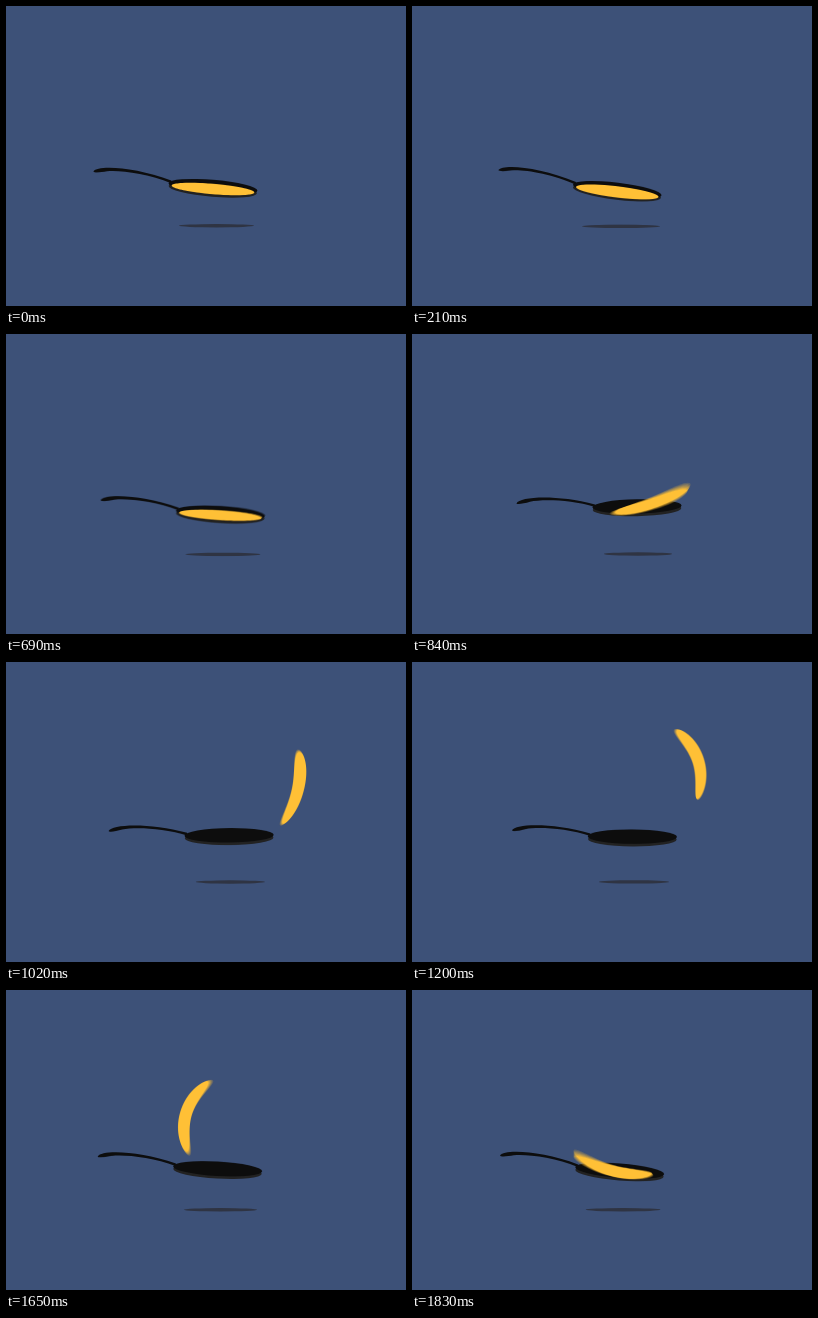
Animation of 400x300 px, one loop 1860 ms. Source, as an HTML page with a canvas:

```html
<!DOCTYPE html>
<html lang="en">
<head>
<meta charset="utf-8">
<title>Pancake flip</title>
<style>
  html, body { margin: 0; width: 100%; height: 100%; overflow: hidden; background: #3d5178; }
  canvas { display: block; width: 400px; height: 300px; }
</style>
</head>
<body>
<canvas id="stage" width="400" height="300"></canvas>
<script>
const LOOP = 1860, STEP = 30, SHUTTER = 14, SAMPLES = 6;
const BG = '#3d5178', BATTER = '#ffc036', IRON = '#0d0d0d', SIDE = '#222222', SHADOW = '#2f3443';
const RAD = Math.PI / 180;

// The pan swings between three poses; tilt in degrees
const REST = { x: 207, tilt: 6, shadowX: 210.5, shadowW: 37.5, shadowY: 219.7 };
const DIP = { x: 204, tilt: 9.6, shadowX: 208, shadowW: 40.5, shadowY: 220.8 };
const TOP = { x: 225, tilt: 0, shadowX: 226, shadowW: 34.2, shadowY: 220 };
const DIP_AT = 540, TOP_AT = 840;

// The pancake turns once around while it is thrown
const SLIDE = 690, LEAVE = 720, LIFT = 780, APEX = 1345, APEX_Y = 97, DROP = 86.5;
const FLIGHT = [
  { t: LEAVE, x: 216, angle: -3 },
  { t: 1020, x: 284, angle: 77 },
  { t: 1380, x: 247.5, angle: 143 },
  { t: 1650, x: 193.5, angle: 253 },
  { t: LOOP, x: 202, angle: 349 }
];

const stage = document.getElementById('stage').getContext('2d');
const layer = document.createElement('canvas');
layer.width = 400;
layer.height = 300;
const ctx = layer.getContext('2d');

const clamp = (v, lo = 0, hi = 1) => Math.max(lo, Math.min(hi, v));
const easeOut = u => Math.sin(u * Math.PI / 2);
const easeInOut = u => u * u * (3 - 2 * u);
const easeIn = u => u ** 1.3;

function blend(a, b, u) {
  const out = {};
  for (const key in a) out[key] = a[key] + (b[key] - a[key]) * u;
  return out;
}

function panPose(t) {
  const pose = t < DIP_AT ? blend(REST, DIP, easeOut(t / DIP_AT))
    : t < TOP_AT ? blend(DIP, TOP, easeInOut((t - DIP_AT) / (TOP_AT - DIP_AT)))
    : blend(TOP, REST, easeIn((t - TOP_AT) / (LOOP - TOP_AT)));
  pose.y = 172.4 + 1.43 * pose.tilt;
  return pose;
}

// Smooth curve through the flight points, at rest at both ends
function flight(t, key) {
  const last = FLIGHT.length - 1;
  let i = 0;
  while (i < last - 1 && FLIGHT[i + 1].t <= t) i++;
  const a = FLIGHT[i], b = FLIGHT[i + 1], span = b.t - a.t, u = (t - a.t) / span;
  const slope = k => {
    if (k === 0 || k === last) return 0;
    const p = FLIGHT[k - 1], n = FLIGHT[k + 1];
    return (n[key] - p[key]) / (n.t - p.t) * span;
  };
  return a[key] + (b[key] - a[key]) * easeInOut(u) +
    slope(i) * u * (1 - u) ** 2 - slope(i + 1) * u * u * (1 - u);
}

function cakePose(t, pan) {
  const tilt = pan.tilt - 1.2;
  const rest = {
    x: pan.x, y: pan.y + 2, angle: -tilt, length: 83,
    bend: 0, half: 4 + 0.2 * pan.tilt, lead: 0, power: 2
  };
  if (t < LEAVE) return rest;
  const half = t < APEX ? APEX - LIFT : LOOP - APEX;
  const fall = clamp(((t - APEX) / half) ** 2);
  const air = clamp(Math.min((t - LEAVE) / 200, (LOOP - t) / 60));
  return {
    x: flight(t, 'x'),
    y: Math.min(t < APEX ? rest.y : Infinity, APEX_Y + DROP * fall),
    angle: flight(t, 'angle'),
    length: 72 + 11 * fall,
    bend: 14 * clamp(Math.min((t - SLIDE) / 570, (LOOP - t) / 60)),
    half: 5.2 + 0.8 * air,
    lead: 0.3 * air * Math.max(0, (APEX - t) / half),
    power: 2 + 1.2 * air
  };
}

function ellipse(x, y, rx, ry, fill) {
  ctx.fillStyle = fill;
  ctx.beginPath();
  ctx.ellipse(x, y, rx, ry, 0, 0, Math.PI * 2);
  ctx.fill();
}

function drawPan({ x, y, tilt }) {
  ctx.save();
  ctx.translate(x, y);
  ctx.rotate(tilt * RAD);
  ctx.fillStyle = IRON;
  ctx.beginPath();
  ctx.moveTo(-120.5, -3);
  ctx.bezierCurveTo(-117, -10, -80, -12, -42, -2);
  ctx.lineTo(-42, 0.6);
  ctx.bezierCurveTo(-66, -6.8, -95, -7.2, -107, -4.6);
  ctx.bezierCurveTo(-113, -2.8, -120, -1.4, -120.5, -3);
  ctx.fill();
  ctx.rotate(-1.2 * RAD);
  ellipse(0, 2.6, 44.3, 7.2, SIDE);
  ellipse(0, 0, 44.6, 7.2, IRON);
  ctx.restore();
}

// Bent lens: a parabolic spine with a rounded thickness profile
function drawCake({ x, y, angle, length, bend, half, lead, power }) {
  const N = 48, reach = length / 2, below = [], above = [];
  for (let i = 0; i <= N; i++) {
    const s = -Math.cos(Math.PI * i / N);
    const px = s * reach, py = bend * (1 - s * s), dy = -2 * bend * s;
    const w = half * (1 + lead * s) * Math.sqrt(Math.max(0, 1 - Math.abs(s) ** power));
    const k = w / Math.hypot(reach, dy);
    below.push([px - dy * k, py + reach * k]);
    above.unshift([px + dy * k, py - reach * k]);
  }
  ctx.save();
  ctx.translate(x, y);
  ctx.rotate(-angle * RAD);
  ctx.fillStyle = BATTER;
  ctx.beginPath();
  below.concat(above).forEach(p => ctx.lineTo(...p));
  ctx.fill();
  ctx.restore();
}

function drawScene(t) {
  const pan = panPose(t);
  ctx.fillStyle = BG;
  ctx.fillRect(0, 0, 400, 300);
  ellipse(pan.shadowX, pan.shadowY, pan.shadowW, 1.7, SHADOW);
  drawPan(pan);
  drawCake(cakePose(t, pan));
}

// Average several moments for motion blur
function render(t) {
  for (let i = 0; i < SAMPLES; i++) {
    const shift = (i / (SAMPLES - 1) - 0.5) * SHUTTER;
    drawScene(clamp(t + shift, 0, LOOP));
    stage.globalAlpha = 1 / (i + 1);
    stage.drawImage(layer, 0, 0);
  }
}

const start = performance.now();
function tick() {
  const t = (performance.now() - start) % LOOP;
  render(Math.floor(t / STEP) * STEP);
  requestAnimationFrame(tick);
}
tick();
</script>
</body>
</html>
```
